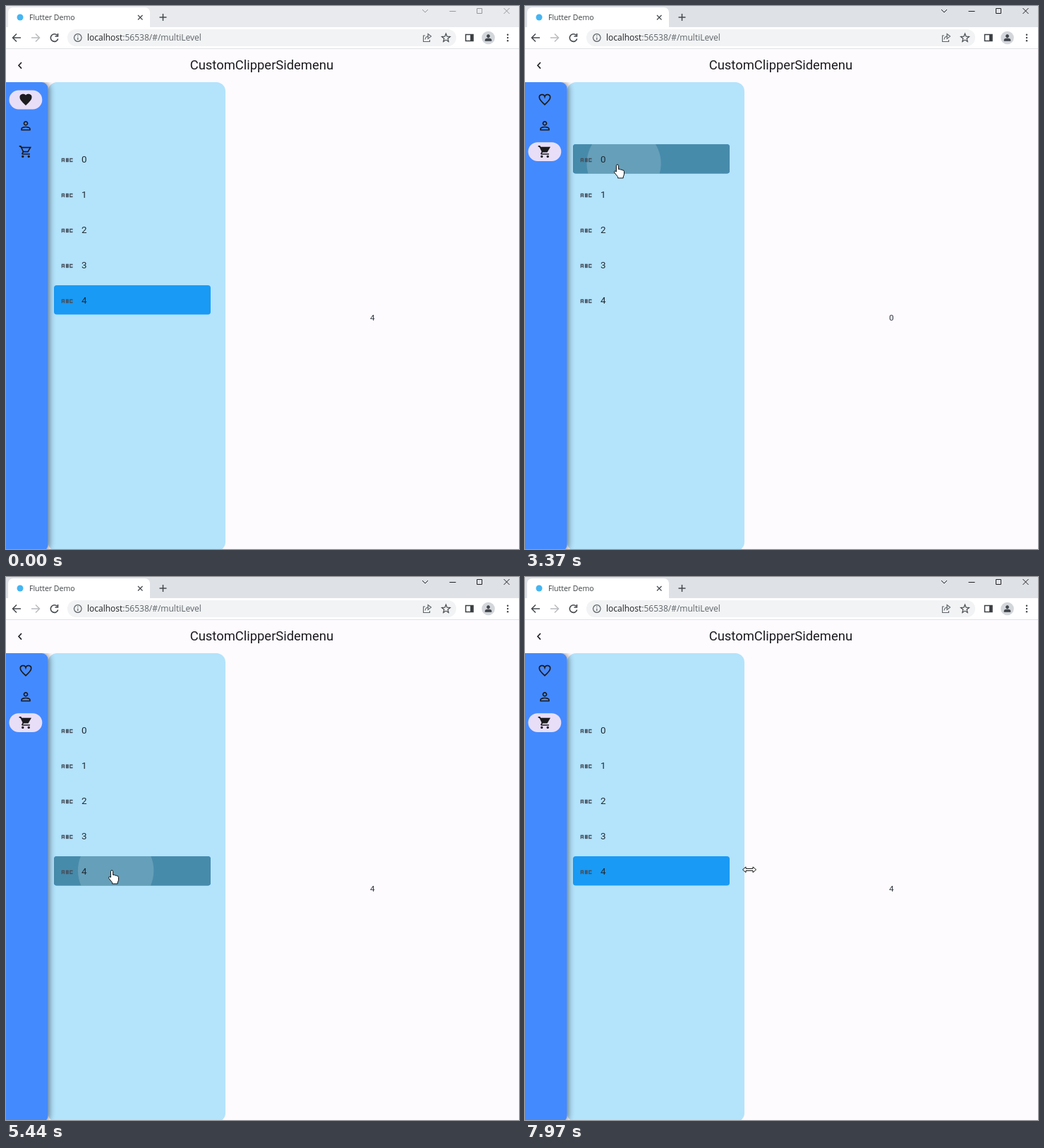
Animation of 727 by 770 pixels, one loop 8000 ms. Source, as an HTML page with a canvas:

```html
<!DOCTYPE html>
<html lang="en">
<head>
<meta charset="utf-8">
<title>Side menu demo</title>
<style>
  html, body { margin: 0; width: 100%; height: 100%; overflow: hidden; background: #fefbff; }
  canvas { display: block; }
</style>
</head>
<body>
<canvas id="stage" width="727" height="770"></canvas>
<script>
const ctx = document.getElementById('stage').getContext('2d');
const LOOP = 8000, STEP = 66.75, START = 290;
const MIN_W = 59.5, MAX_W = 164, PANEL_W = 251.5;
const ROW_X = 68, ROW_W = 222, ROW_H = 41.6, ROWS = [0, 1, 2, 3, 4];
const HOVER_FADE = 150, PRESS_TIME = 170;
const INK = '#1c1b1f', GREY = '#45494d';
const drag = { press: 6230, release: 7640 };

// Places where the pointer rests; it eases from one to the next
const stop = (arrive, leave, x, y) => ({ arrive, leave, x, y });
const STOPS = [
  stop(0, START, 696, 758),
  stop(620, 850, 594, 450),
  stop(1630, 2050, 40.5, 177),
  stop(2300, 2760, 36, 218),
  stop(3000, 3435, 131, 225),
  stop(3750, 4050, 138, 275),
  stop(4340, 4655, 145, 322),
  stop(4850, 5150, 148, 372),
  stop(5240, 5500, 150, 416),
  stop(5830, 6300, 54, 380),
  stop(7030, 7170, 369, 408),
  stop(7560, 7640, 57, 410),
  stop(7860, LOOP, 318, 415)
];

const clamp = (v, lo = 0, hi = 1) => Math.min(hi, Math.max(lo, v));
const lerp = (a, b, k) => a + (b - a) * k;
const smooth = k => k * k * (3 - 2 * k);
const rowTop = i => Math.round(195.8 + i * 50.1);
const navY = i => 133 + i * 36.8;
const isDown = (t, { press, release }) => t >= press && t < release;

// Each rest on a menu item ends with a click on it
const clicksIn = (from, to, itemAt) => STOPS
  .filter(s => s.x > from && s.x < to && s.leave < drag.press)
  .map(s => ({ press: s.leave - 75 - PRESS_TIME, release: s.leave - 75, item: itemAt(s.y) }));
const navClicks = clicksIn(0, 50, y => Math.round((y - 133) / 36.8));
const rowClicks = clicksIn(ROW_X, ROW_X + ROW_W, y => Math.floor((y - 195.8) / 50.1));
const picked = (clicks, t, initial) => clicks.reduce((item, c) => t >= c.release ? c.item : item, initial);

function pointerAt(t) {
  const next = STOPS.findIndex(s => t < s.arrive);
  if (next < 0) return STOPS[STOPS.length - 1];
  const a = STOPS[Math.max(0, next - 1)], b = STOPS[next];
  const k = smooth(clamp((t - a.leave) / (b.arrive - a.leave)));
  return { x: lerp(a.x, b.x, k), y: lerp(a.y, b.y, k) };
}

const menuWidth = t => isDown(t, drag) ? clamp(pointerAt(t).x + 5.5, MIN_W, MAX_W) : MIN_W;

function overRow(t, i) {
  const p = pointerAt(t), x = p.x - ROW_X - menuWidth(t) + MIN_W, y = p.y - rowTop(i);
  return t >= START && x > 0 && x < ROW_W && y >= 0 && y < ROW_H;
}

// Share of the fade window spent over the row
function hoverLevel(t, i) {
  let hits = 0;
  for (let k = 0; k < 10; k++) hits += overRow(t - k * HOVER_FADE / 10, i);
  return hits / 10;
}

function box(x, y, w, h, r, fill) {
  ctx.beginPath();
  ctx.roundRect(x, y, w, h, r);
  ctx.fillStyle = fill;
  ctx.fill();
}

function disc(x, y, r, fill) {
  ctx.beginPath();
  ctx.arc(x, y, r, 0, Math.PI * 2);
  ctx.fillStyle = fill;
  ctx.fill();
}

function line(d, color, width = 1.2, fill) {
  const path = new Path2D(d);
  if (fill) {
    ctx.fillStyle = fill;
    ctx.fill(path);
  }
  ctx.strokeStyle = color;
  ctx.lineWidth = width;
  ctx.stroke(path);
}

// Draws inside a 24-unit square centred on (cx, cy)
function icon(cx, cy, scale, draw) {
  ctx.save();
  ctx.translate(cx - 12 * scale, cy - 12 * scale);
  ctx.scale(scale, scale);
  draw();
  ctx.restore();
}

function text(str, x, y, font, color, align = 'left', spacing = 0) {
  ctx.font = font;
  ctx.fillStyle = color;
  ctx.textAlign = align;
  ctx.letterSpacing = spacing + 'px';
  ctx.fillText(str, x, y);
}

const PERSON = 'M12 5a3 3 0 1 0 .01 0zM5 19v-2c0-2 5-3 7-3s7 1 7 3v2z';
const NAV = [
  { label: 'Wishlist', shape: 'M12 20C6 14.7 3 11.9 3 8.5A4.6 4.6 0 0 1 12 6.7 4.6 4.6 0 0 1 21 8.500C21 11.9 18 14.7 12 20z' },
  { label: 'Account', shape: PERSON },
  { label: 'Cart', shape: 'M4.6 5H19.7L15.6 12H7.9z',
    detail: 'M1 3h2.6l1 2M7.900 12l-1.800 3.3.5.7H19M7 19a1 1 0 1 0 .01 0zM17 19a1 1 0 1 0 .01 0z' }
];
const ABC = 'M3.75 15V9.75h3.500V15M3.75 12.75h3.500M10.75 9.75h3v4.500h-3zM10.75 12h3M20.250 11V9.75h-3.500v4.500h3.500V13';
const CURSORS = {
  arrow: 'M0 0V14.5L3.3 11.4 5.4 16 7.6 15 5.6 10.6H10.2z',
  hand: 'M-1.6 10V1.5a1.6 1.6 0 0 1 3.2 0V6.6q2.6-1 2.8.6 2.6-.8 2.8.8 2.3-.4 2.3 1.6V13q0 2-1.3 4V19H.6V17.3L-4 11.6q-1.200-2.600.8-2.7z',
  resize: 'M-9.5 0l4.5-4v2.600H5V-4L9.5 0 5 4V1.4H-5V4z'
};

function drawStar(cx, cy) {
  ctx.beginPath();
  for (let i = 0; i < 10; i++) {
    const r = i % 2 ? 2.7 : 6.2, a = i * Math.PI / 5;
    ctx.lineTo(cx + r * Math.sin(a), cy - r * Math.cos(a));
  }
  ctx.closePath();
  ctx.strokeStyle = GREY;
  ctx.lineWidth = 1.2;
  ctx.stroke();
}

function drawBrowser(active) {
  const control = active ? '#202124' : '#96989b', soft = '#5f6368';
  const urlFont = '12px "Open Sans", sans-serif';
  box(0, 0, 727, 30, 0, active ? '#dee1e6' : '#e8eaed');
  box(0, 30, 727, 30, 0, '#fff');
  box(0, 60, 727, 1, 0, '#dfe1e5');
  box(3, 2, 201, 30, [7, 7, 0, 0], '#fff');
  disc(20, 16, 4.5, '#45b5f2');
  text('Flutter Demo', 33, 20, '10.5px "Open Sans", sans-serif', '#3c4043');
  line('M187 13l6.500 6.500M193.500 13l-6.500 6.500', GREY);
  line('M217.500 16h10M222.500 11v10', GREY, 1.5);
  line('M590 5l4 4 4-4M628.500 7.500h9M667.500 3.500h7v7h-7zM705.500 3l8 8M713.500 3l-8 8', control, 1);

  line('M21 45H10M15 39.500L9.500 45l5.500 5.500', GREY, 1.5);
  line('M36 45h11M42 39.500l5.500 5.500-5.500 5.500', '#b9bbbe', 1.5);
  line('M72.500 41.500a5.300 5.300 0 1 0 1.200 5M73.500 39v4h-4', GREY, 1.6);
  box(87, 33, 551, 24, 12, '#f1f3f4');
  line('M101.800 39.700a5.300 5.300 0 1 0 .01 0zM101.800 44.500v3.500M101.800 41.800v1.300', soft);
  text('localhost', 115, 49, urlFont, '#202124');
  text(':56538/#/multiLevel', 115 + ctx.measureText('localhost').width, 49, urlFont, soft);
  line('M594 42h-2.500v8.500h9V48M594 47.500q.5-4.500 5-4.500M598 39.500l4.500 3.500-4.500 3.500z', soft, 1.1);
  drawStar(623.5, 45.4);
  line('M651.500 40.500H662v9h-10.500z', '#3c4043', 1.5);
  box(658, 40, 4, 10, 0, '#3c4043');
  disc(683.5, 45, 9.3, '#d3d6da');
  icon(683.5, 45, .6, () => line(PERSON, '#41464c', 2, '#41464c'));
  for (let i = -1; i < 2; i++) disc(711, 45 + i * 4.3, 1.2, GREY);
}

function drawRipple(t, x, y, { press }) {
  const age = t - press;
  if (age < 0 || age > 500) return;
  const from = pointerAt(press), k = age / 900;
  ctx.save();
  ctx.beginPath();
  ctx.roundRect(x, y, ROW_W, ROW_H, 4);
  ctx.clip();
  disc(lerp(from.x, x + ROW_W / 2, k), lerp(from.y, y + ROW_H / 2, k), 10 + age * .25,
    `rgba(255,255,255,${.17 * (1 - clamp((age - 200) / 300))})`);
  ctx.restore();
}

function drawRow(t, i, dx, selected) {
  const x = ROW_X + dx, y = rowTop(i);
  if (selected) box(x, y, ROW_W, ROW_H, 4, '#199af5');
  ctx.globalAlpha = hoverLevel(t, i);
  box(x, y, ROW_W, ROW_H, 4, '#478bab');
  ctx.globalAlpha = 1;
  drawRipple(t, x, y, rowClicks[i]);
  icon(x + 18.6, y + 22.5, .88, () => line(ABC, '#46505c', 1.5));
  text(i, x + 39, y + 26.3, '13.4px Roboto, sans-serif', '#1f2a33');
}

function drawNavItem({ label, shape, detail }, y, on, expanded) {
  if (on) box(4.5, y - 13.4, 46.8, 26.8, 13.4, '#e8def8');
  icon(28, y, .85, () => {
    line(shape, INK, 2, on && INK);
    if (detail) line(detail, INK, 2);
  });
  if (!expanded) return;
  if (on) text(label, 59, y + 4.2, '500 12px Roboto, sans-serif', '#fff');
  else text(label, 59, y + 3.4, '10px Roboto, sans-serif', '#203b66', 'left', .5);
}

function drawApp(t) {
  const width = menuWidth(t), dx = width - MIN_W;
  const row = picked(rowClicks, t, 4), nav = picked(navClicks, t, 0);
  box(0, 61, 727, 709, 0, '#fefbff');
  line('M22 80l-4 4.300 4 4.300', INK, 1.6);
  text('CustomClipperSidemenu', 362.4, 90.3, '18.4px Roboto, sans-serif', INK, 'center');
  text(row, 519.2 + dx / 2, 446, '11.7px Roboto, sans-serif', '#2a333b', 'center');

  box(width, 108, PANEL_W, 665, 13, '#b4e3fc');
  ROWS.forEach(i => drawRow(t, i, dx, i === row));

  ctx.save();
  ctx.beginPath();
  ctx.rect(0, 108, 727, 662);
  ctx.clip();
  ctx.shadowColor = 'rgba(0,0,0,.48)';
  ctx.shadowBlur = 9;
  ctx.shadowOffsetX = 2;
  box(-20, 108, width + 20, 665, 9, '#448aff');
  ctx.shadowColor = 'transparent';
  ctx.beginPath();
  ctx.rect(0, 108, width, 662);
  ctx.clip();
  NAV.forEach((item, i) => drawNavItem(item, navY(i), i === nav, dx > 1));
  ctx.restore();
}

function cursorType(t, { x, y }) {
  const edge = menuWidth(t);
  if (y > 108 && [edge, edge + PANEL_W].some(e => Math.abs(x - e) < 8)) return 'resize';
  const overNav = x < edge && y > 118 && y < 225;
  return overNav || ROWS.some(i => overRow(t, i)) ? 'hand' : 'arrow';
}

function drawPointer(t) {
  if (t < START) return;
  const p = pointerAt(t);
  if ([...rowClicks, ...navClicks, drag].some(c => isDown(t, c))) disc(p.x, p.y, 10, '#9cbd45');
  ctx.save();
  ctx.translate(p.x, p.y);
  line(CURSORS[cursorType(t, p)], '#111', 1, '#fff');
  ctx.restore();
}

function frame(now) {
  // The picture is refreshed about 15 times a second
  const t = START + Math.floor((now % LOOP - START) / STEP + .1) * STEP;
  drawBrowser(t >= navClicks[0].press);
  drawApp(t);
  drawPointer(t);
  requestAnimationFrame(frame);
}
requestAnimationFrame(frame);
</script>
</body>
</html>
```
